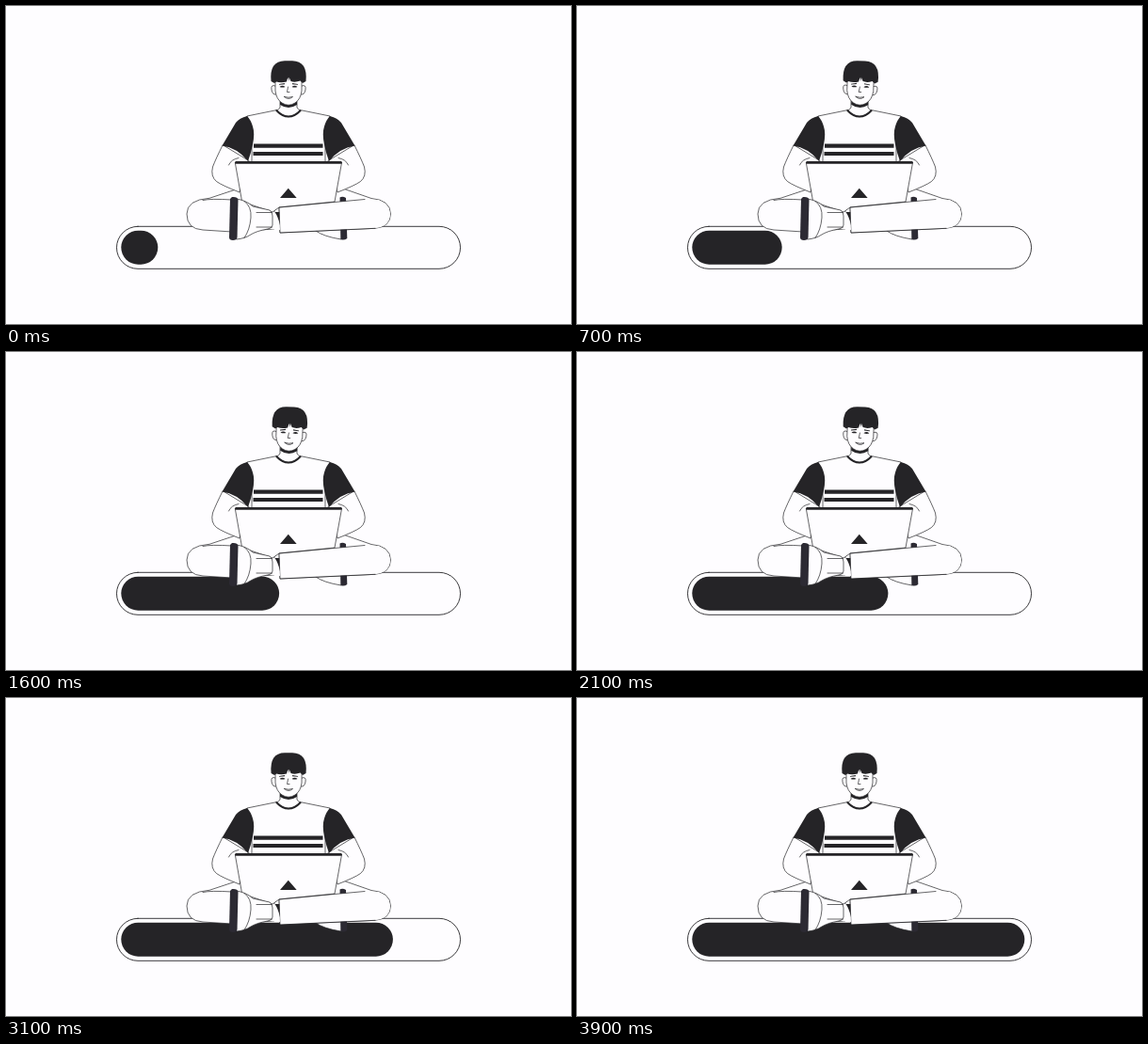
An HTML page for the animation above (4 s loop, 600 by 338 pixels).

```html
<!DOCTYPE html>
<html>
<head>
<meta charset="utf-8">
<style>
  html, body { margin: 0; width: 100%; height: 100%; overflow: hidden; background: #fefdff; }
  svg { display: block; }
  .line { fill: #fefdff; stroke: #252427; stroke-width: .7; stroke-linejoin: round; stroke-linecap: round; }
  .open { fill: none; }
  .dark { fill: #252427; }
  .sole { fill: #2c2a33; }
</style>
</head>
<body>
<svg width="600" height="338" viewBox="0 0 600 338">
  <rect class="line" x="117.5" y="234.3" width="365" height="45" rx="22.5" style="stroke-width:.9"/>
  <rect class="dark" id="progress" x="122.3" y="238.7" width="39" height="36" rx="18"/>

  <!-- legs and far shoe -->
  <path class="line" d="M329 239Q337 245 356 248V234Z"/>
  <path class="line" d="M247 194L216 204.3Q192 206 192 221Q192 237 209 238L240 240L285 237V196Z"/>
  <path class="line open" d="M209 206.5Q217 204.5 240 206"/>
  <path class="line" d="M355 193L388 204.5Q408 206 408.5 221Q408 235 392 236.3L291 241L290 213L300 195Z"/>
  <path class="sole" d="M354.5 203.5Q357.5 202 361 204L362.3 247Q359 249.5 355.5 248Z"/>
  <path fill="#fefdff" d="M290 214L381 205.5L395 206Q407 210 408 221Q407.5 234.5 392 236L291 240.5Z"/>

  <!-- arms -->
  <path class="line" d="M230 148Q223 162 219.5 171Q217 181 223.5 186.5Q230 191 248 198L258 165Z"/>
  <path class="line" d="M370 148Q377 162 380.5 171Q383 181 376.5 186.5Q370 191 352 198L342 165Z"/>
  <path class="line open" d="M247 161.5Q239 163 236.5 169M353 161.5Q361 163 363.5 169"/>

  <!-- shirt -->
  <path class="line" d="M287 110.7L256 117Q262 140 261 166H339Q338 140 344 117L313 110.7Q300 125 287 110.7Z"/>
  <path class="dark" d="M256 117Q248 119 244 124L229.5 148.5Q246 151 257 165Q266 140 262 128Q260 121 256 117ZM344 117Q352 119 356 124L370.5 148.5Q354 151 343 165Q334 140 338 128Q340 121 344 117Z"/>
  <path class="dark" d="M263 146.5H336.5V150.7H263ZM262.5 154.9H336.5V159H262.5Z"/>
  <path class="line" d="M291 100V108Q290 110 287 111Q300 124 313 111Q310 110 309 108V100"/>
  <path d="M287 110.7Q300 124.5 313 110.7" fill="none" stroke="#252427" stroke-width="2"/>

  <!-- head -->
  <g id="head">
    <path class="dark" d="M291 101H309V105Q300 111 291 105Z"/>
    <path class="line" d="M286 85Q281 83 282 89Q283 95 287 94M314 85Q319 83 318 89Q317 95 313 94"/>
    <path class="line" d="M286 76V90Q287 99 293 103Q300 107.5 307 103Q313 99 314 90V76Z"/>
    <path class="dark" d="M285 82L281.5 80Q279.5 58.5 296 58.3H304Q320.5 58.5 318.5 80L315 82L312.5 79.5Q307 81.5 302.5 80L300.5 75.5L300.5 80L299.2 76L298 80.5Q292 82 287 80.5Z"/>
    <path class="line open" d="M299.5 86L298.5 91.5H301M295.5 96.5Q300 98 304.5 96.5Q300 100.5 295.5 96.5"/>
    <path class="dark" d="M290 83L296 82V83.2L290 83.8ZM310 83L304 82V83.2L310 83.8Z"/>
    <path class="dark" d="M290.5 86Q293.5 83.3 296.5 86Q293.5 87.2 290.5 86ZM303.5 86Q306.5 83.3 309.5 86Q306.5 87.2 303.5 86Z"/>
  </g>

  <!-- laptop -->
  <path class="line" d="M243.7 166.5H356.5L349 208L290 214L283 219L251 208Z"/>
  <path class="dark" d="M244 165H356Q358 166.5 356 167.7H244Q242 166.5 244 165ZM299.8 193.8L308.7 204H291Z"/>

  <!-- front leg and near shoe -->
  <path class="line open" d="M381 205.5L290 214L291 241L392 236.3"/>
  <path fill="#fefdff" d="M281 219H290L291 238L281 237Z"/>
  <path class="dark" d="M285.5 219H290.3L291 233Q289 224 285.5 219Z"/>
  <path class="line" d="M245 205Q256 207 262 213L280 217Q283 219 283 223V233Q283 236 278 237Q266 239 259 243.5Q254 247 245 248Z"/>
  <path class="line open" d="M253 207.5Q261 213 260 225Q259 238 253 246.5M266 219.5H282.5M266 235H282.5"/>
  <path class="sole" d="M240 203Q246 202.5 246.5 206L245.5 246Q245 249 241 249T237 246L238 205Z"/>
</svg>
<script>
  const LOOP = 4000, STEP = 100;
  const progress = document.getElementById('progress');
  const head = document.getElementById('head');

  function ease(t, from, to) {
    const p = Math.min(1, Math.max(0, (t - from) / (to - from)));
    return p * p * (3 - 2 * p);
  }

  function draw(now) {
    const t = Math.floor((now % LOOP) / STEP) * STEP;
    const tilt = 2.3 * (ease(t, 0, 800) - ease(t, 2500, 3200));
    progress.setAttribute('width', 39 + 314 * t / (LOOP - STEP));
    head.setAttribute('transform', `rotate(${tilt} 300 109)`);
    requestAnimationFrame(draw);
  }
  requestAnimationFrame(draw);
</script>
</body>
</html>
```
